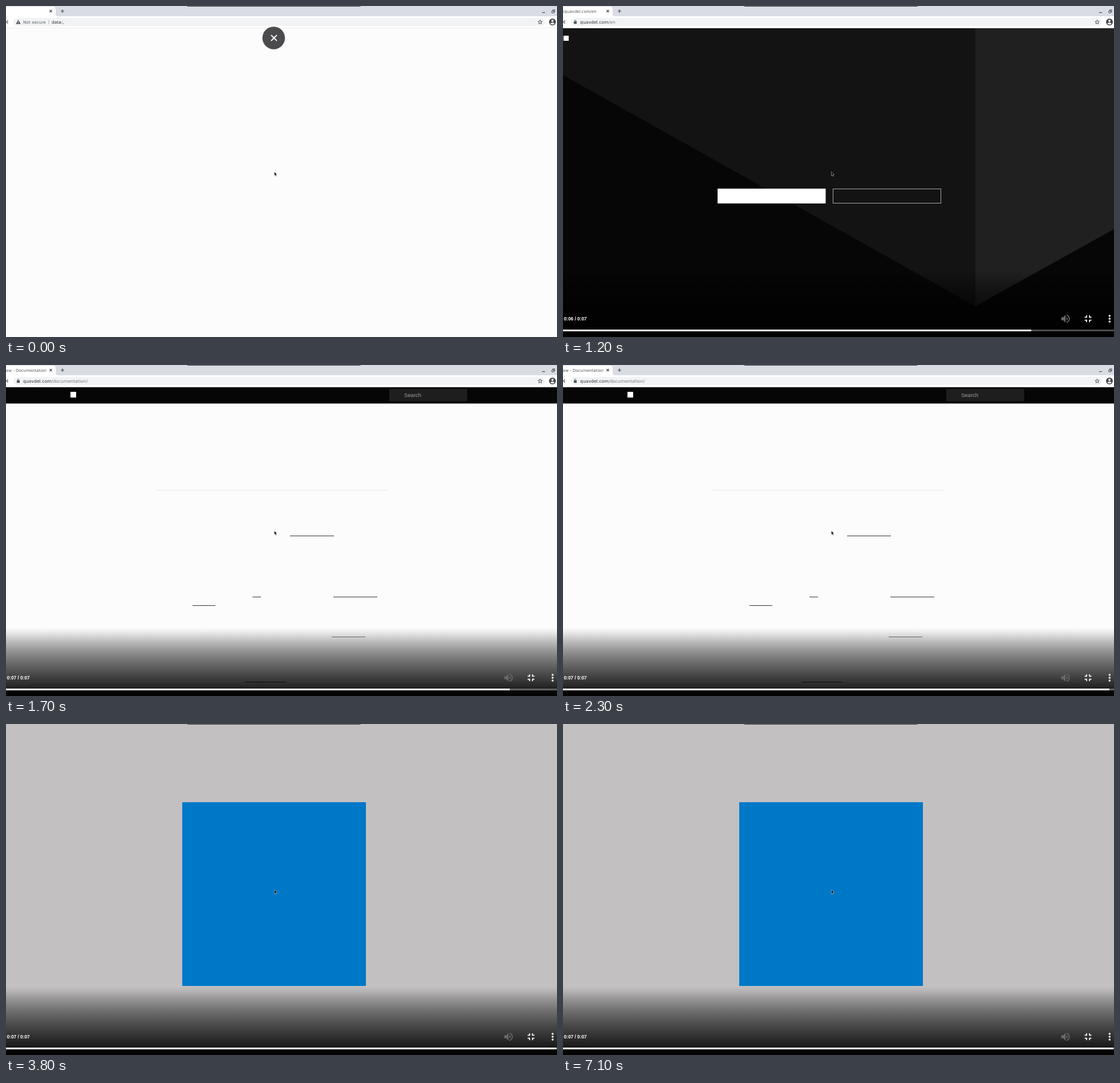
Recreate the animation shown at these times as an HTML page. Size 966 by 580 pixels, loop 7200 ms.

```html
<!DOCTYPE html>
<html lang="en">
<head>
<meta charset="utf-8">
<title>Session replay</title>
<style>
html, body { margin: 0; width: 100%; height: 100%; overflow: hidden; background: #fcfcfc; }
svg { display: block; width: 966px; height: 580px; }
text { font-family: "DejaVu Sans", sans-serif; white-space: pre; }
.sans { font-family: "Liberation Sans", Arial, sans-serif; }
</style>
</head>
<body>
<svg viewBox="0 0 966 580" xmlns="http://www.w3.org/2000/svg">
  <defs>
    <linearGradient id="shade" x1="0" y1="0" x2="0" y2="1">
      <stop offset="0" stop-opacity="0"/>
      <stop offset=".07" stop-opacity=".07"/>
      <stop offset=".17" stop-opacity=".21"/>
      <stop offset=".33" stop-opacity=".4"/>
      <stop offset=".5" stop-opacity=".56"/>
      <stop offset=".72" stop-opacity=".74"/>
      <stop offset=".9" stop-opacity=".88"/>
      <stop offset="1" stop-opacity=".95"/>
    </linearGradient>
  </defs>

  <g id="browser">
    <rect width="966" height="580" fill="#fcfcfc"/>

    <g id="home">
      <rect y="39" width="966" height="541" fill="#060606"/>
      <path d="M0 39H723V526L0 121Z" fill="#131313"/>
      <path d="M723 39H966V391L723 526Z" fill="#202020"/>
      <rect x="1" y="52" width="9" height="9" fill="#fff"/>
      <rect x="271" y="320" width="189.500" height="26" fill="#fff"/>
      <rect x="473.500" y="320.500" width="189" height="25" fill="none" stroke="#a8a8a8"/>
    </g>

    <g id="docs">
      <rect y="39" width="966" height="28.500" fill="#060606"/>
      <rect x="113" y="47" width="10" height="10" fill="#fff"/>
      <rect x="672" y="42" width="136.500" height="21.500" fill="#1e1e1e"/>
      <text class="sans" x="698" y="56" font-size="9.500" fill="#a0a0a0">Search</text>
      <path d="M262 219.500H670" stroke="#e9e9e9"/>
      <path d="M498 299.500H575M432 406.500H447M574 406.500H651M327 421.500H367M419 555.500H490" stroke="#333"/>
      <path d="M571 476.500H630" stroke="#777"/>
    </g>

    <rect width="966" height="18" fill="#d9dce3"/>
    <path d="M0 1H82Q87 1 87 6V14Q87 18 91 18V19H0Z" fill="#fff"/>
    <rect y="18" width="966" height="20.500" fill="#fff"/>
    <path d="M0 38.500H966" stroke="#ececee"/>
    <rect x="13" y="21" width="932" height="14" rx="7" fill="#f1f3f4"/>
    <text id="tab" y="11.500" font-size="7" fill="#50545a"></text>
    <g fill="none" stroke="#45494e" stroke-width="1.200">
      <path d="M76.500 7L80.500 11M80.500 7L76.500 11"/>
      <path d="M96 9H102M99 6V12"/>
      <path d="M940 11.500H945"/>
      <path d="M957 8.500H960.500V12H957ZM958.700 8.500V6.700H962V10.300H960.500" stroke-width="1"/>
      <path d="M3.500 25L.5 28L3.500 31M.5 28H4" stroke="#777"/>
      <path d="M936.500 24.300L937.500 27L940.300 27.100L938.100 28.800L938.900 31.500L936.500 29.900L934.100 31.500L934.900 28.800L932.700 27.100L935.500 27Z" stroke-width=".9"/>
    </g>
    <g>
      <circle cx="958" cy="28" r="6" fill="#45494e"/>
      <circle cx="958" cy="26" r="1.900" fill="#fff"/>
      <path d="M954.200 30.600Q958 27.600 961.800 30.600Q958 34.500 954.200 30.600Z" fill="#fff"/>
    </g>
    <g id="insecure">
      <path d="M21.500 24L25.500 31.500H17.500Z" fill="#4a4e53"/>
      <path d="M21.500 26.500V29M21.500 29.600V30.600" stroke="#f1f3f4"/>
      <text x="30" y="31" font-size="7.400" fill="#5f6368">Not secure</text>
      <path d="M75 24V32" stroke="#a6aaaf" stroke-width=".8"/>
      <text x="80" y="31" font-size="7.500" fill="#2f3135">data:,</text>
    </g>
    <g id="secure">
      <rect x="19" y="27" width="5" height="4.300" rx=".5" fill="#4f5358"/>
      <path d="M20.200 27V26Q20.200 24.700 21.500 24.700Q22.800 24.700 22.800 26V27" fill="none" stroke="#4f5358" stroke-width=".9"/>
      <text x="30" y="31" font-size="7.700" fill="#2f3135">quavdel.com<tspan id="path" fill="#777b80"></tspan></text>
    </g>
  </g>

  <g id="desktop">
    <rect width="966" height="580" fill="#c2c0c1"/>
    <rect x="309" y="137" width="322" height="322" fill="#0078c8"/>
  </g>

  <path d="M470.500 290.500V297.300L472 296L473.100 298.500L474.300 298L473.200 295.600H475.200Z" fill="#000" stroke="#fff" stroke-opacity=".75" stroke-width=".6"/>
  <rect x="318" width="303.500" height="1" fill="#3c3c3f"/>

  <g id="controls">
    <rect y="460" width="966" height="120" fill="url(#shade)"/>
    <rect y="571" width="966" height="9" fill="#000" fill-opacity=".75"/>
    <text id="clock" class="sans" x="1.500" y="550.600" font-size="8.300" font-weight="700" fill="#fff"></text>
    <path transform="translate(871 538) scale(.833)" fill="#686868" d="M3 9v6h4l5 5V4L7 9H3zm13.500 3c0-1.770-1.020-3.290-2.500-4.030v8.050c1.480-.73 2.500-2.250 2.500-4.020zM14 3.230v2.060c2.890.86 5 3.540 5 6.710s-2.110 5.850-5 6.710v2.060c4.010-.91 7-4.490 7-8.770s-2.990-7.860-7-8.770z"/>
    <path transform="translate(910.300 537.800) scale(.85)" fill="#fff" d="M5 16h3v3h2v-5H5v2zm3-8H5v2h5V5H8v3zm6 11h2v-3h3v-2h-5v5zm2-11V5h-2v5h5V8h-3z"/>
    <g fill="#fff">
      <circle cx="958.300" cy="543" r="1.750"/>
      <circle cx="958.300" cy="548" r="1.750"/>
      <circle cx="958.300" cy="553" r="1.750"/>
    </g>
    <rect y="567" width="966" height="3" fill="#fff" fill-opacity=".3"/>
    <rect id="played" y="567" height="3" fill="#fff"/>
  </g>

  <g id="exit">
    <circle cx="469.300" cy="56.300" r="20.500" fill="#000" fill-opacity=".08"/>
    <circle cx="469.300" cy="56" r="19.700" fill="#4b4b4e"/>
    <path d="M464.800 51L474.800 61M474.800 51L464.800 61" stroke="#fff" stroke-width="1.800"/>
  </g>

  <path id="pointer" d="M696 341V354L698.900 351.300L700.900 355.600L702.900 354.700L701 350.600H704.700Z" fill="#fff" stroke="#222" stroke-width=".9"/>
</svg>
<script>
const LOOP = 7200, STEP = 100;
const HOME = 1200, DOCS = 1700, END = 2400;
const $ = id => document.getElementById(id);
const clamp = v => Math.min(1, Math.max(0, v));
const ease = v => v * v * (3 - 2 * v);
const show = (id, on) => $(id).setAttribute("display", on ? "inline" : "none");

function draw(ms) {
  const t = Math.floor(ms / STEP) * STEP;
  const blank = t < HOME, docs = t >= DOCS;
  show("browser", t < END);
  show("desktop", t >= END);
  show("home", !blank && !docs);
  show("docs", docs);
  show("insecure", blank);
  show("secure", !blank);
  $("tab").textContent = blank ? "" : docs ? "ew - Documentation" : "/quavdel.com/en";
  $("path").textContent = docs ? "/documentation/" : "/en";

  // player overlay
  $("controls").setAttribute("opacity", clamp((t - 100) / 200));
  $("exit").setAttribute("transform", `translate(0 ${-80 * ease(clamp((t - 100) / 300))})`);
  $("played").setAttribute("width", Math.min(965, 796 + 0.1245 * (t - 1000)));
  $("clock").textContent = (t < 1600 ? "0:06" : "0:07") + " / 0:07";

  show("pointer", t >= 5100 && t < 5500);
}

const start = performance.now();
function tick() {
  draw((performance.now() - start) % LOOP);
  requestAnimationFrame(tick);
}
tick();
</script>
</body>
</html>
```
